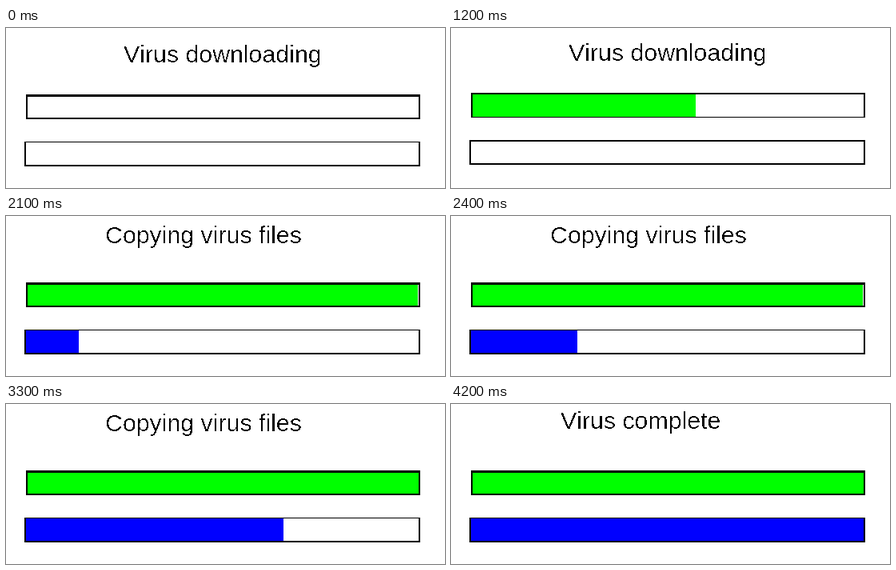
Recreate the animation shown at these times as an HTML page. Size 549 by 200 pixels, loop 4500 ms.

```html
<!DOCTYPE html>
<html lang="en">
<head>
<meta charset="utf-8">
<style>
  html, body { margin: 0; height: 100%; overflow: hidden; background: #fff; }
  svg { display: block; width: 549px; height: 200px; }
  text { font: 30.3px "Liberation Sans", Arial, sans-serif; font-kerning: none; }
</style>
</head>
<body>
<svg viewBox="0 0 549 200" shape-rendering="crispEdges">
  <filter id="crisp" x="0" y="0" width="549" height="200" filterUnits="userSpaceOnUse">
    <feComponentTransfer><feFuncA type="discrete" tableValues="0 0 1"/></feComponentTransfer>
  </filter>
  <g filter="url(#crisp)"><text id="title"></text></g>
  <path id="green" fill="#0f0"/>
  <path id="blue" fill="#00f"/>
  <path id="frames" fill-rule="evenodd"/>
</svg>
<script>
const STEP = 300;
const greenEnds = [27, 80, 126, 207, 306, 427, 515, 515, 515, 516];
const blueEnds = [91, 158, 204, 259, 347, 412, 492, 516];
const COPY = 7, DONE = 14, COUNT = 15;

const $ = id => document.getElementById(id);
const box = (x0, y0, x1, y1) => `M${x0} ${y0}H${x1}V${y1}H${x0}Z`;

function titleAt(step, raised) {
  if (step >= DONE) return ["Virus complete", 137, 31];
  if (step >= COPY) return ["Copying virus files", 124, 34];
  return ["Virus downloading", 147, raised ? 41 : 43];
}

function greenAt(step, raised) {
  // The first strokes of the fill have slightly uneven edges.
  const early = [
    "",
    box(27, 86, 80, 111),
    box(75, 86, 126, 112),
    box(126, 87, 207, 111)
  ];
  if (step < early.length) return early.slice(0, step + 1).join("");
  const end = greenEnds[Math.min(step, greenEnds.length - 1)];
  return raised ? box(27, 83, end, 111) : box(27, 86, end, 112);
}

function framesAt(raised) {
  return raised
    ? box(25, 81, 518, 112) + box(27, 83, 516, 111) +
      box(23, 140, 518, 171) + box(25, 142, 516, 169)
    : box(25, 83, 518, 114) + box(27, 86, 516, 112) +
      box(23, 142, 518, 173) + box(25, 143, 516, 171);
}

function draw(step) {
  const raised = step >= 4 && step < COPY;
  const [words, x, y] = titleAt(step, raised);
  $("title").textContent = words;
  $("title").setAttribute("x", x);
  $("title").setAttribute("y", y);
  $("green").setAttribute("d", greenAt(step, raised));
  $("blue").setAttribute("d", step < COPY ? "" : box(25, 143, blueEnds[step - COPY], 171));
  $("frames").setAttribute("d", framesAt(raised));
}

const start = performance.now();
let shown = -1;
function tick() {
  const step = Math.floor((performance.now() - start) / STEP) % COUNT;
  if (step !== shown) draw(shown = step);
  requestAnimationFrame(tick);
}
tick();
</script>
</body>
</html>
```
